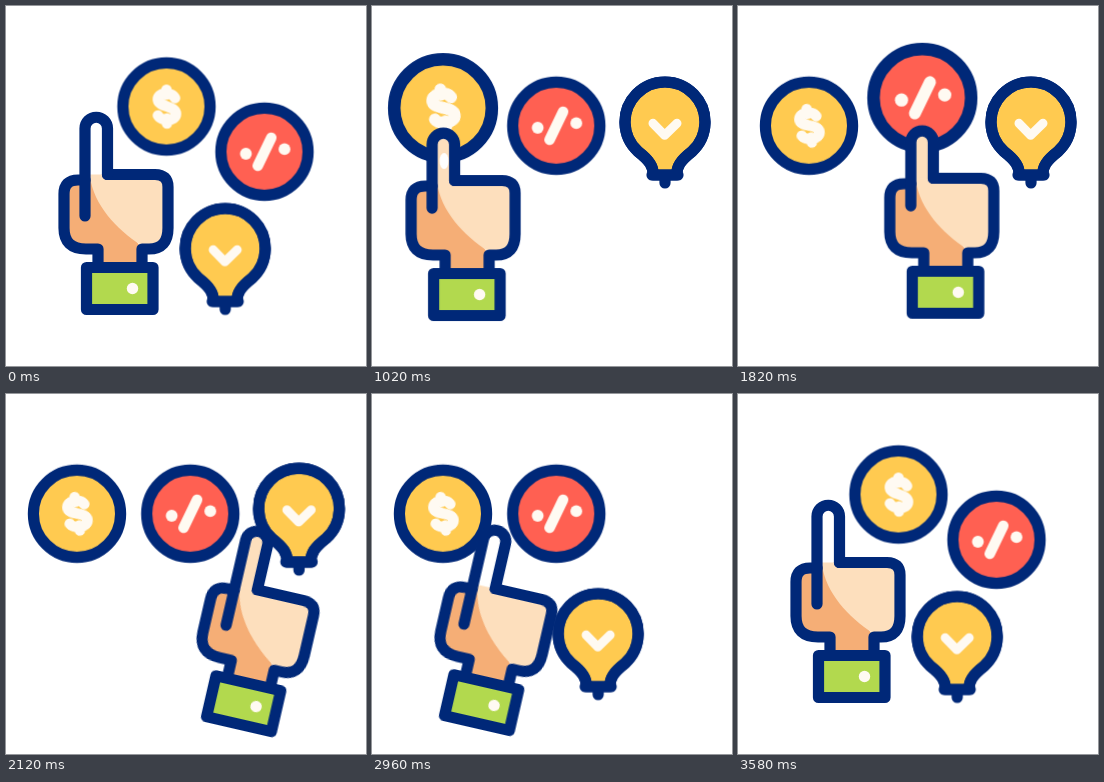
Write an HTML page that moves like this. It is 360x360 px and loops after 3.6 s.

```html
<!DOCTYPE html>
<html lang="en">
<head>
<meta charset="utf-8">
<title>Choosing an offer</title>
<style>
html, body { margin: 0; width: 100%; height: 100%; overflow: hidden; background: #fff; }
svg { display: block; width: 100vw; height: 100vh; }

.line { fill: none; stroke: #002878; stroke-width: 11.2; stroke-linecap: round; stroke-linejoin: round; }
.mark { fill: none; stroke: #fffaf2; stroke-width: 9; stroke-linecap: round; stroke-linejoin: round; }
.bold { stroke-width: 10.6; }
.dot { fill: #fffaf2; }
.gold { fill: #ffca50; }
.red { fill: #ff6052; }
.green { fill: #b2d94e; }
.skin { fill: #fddfbd; }
.shade { fill: #f5ae76; }

.anim { animation: 3.6s ease-in-out infinite; }
.dollar { animation-name: dollar; }
.turn { animation-name: turn; }
.percent { animation-name: percent; }
.balloon-x { animation-name: balloon-x; }
.balloon-y { animation-name: balloon-y; }
.swell { animation-name: swell; }
.hand-x { animation-name: hand-x; }
.hand-y { animation-name: hand-y; }
.finger { animation-name: press; }
.tip { animation-name: tip, tint; }
.shine { animation-name: shine; }

@keyframes dollar {
  0%, 2.8% { transform: translate(160.5px, 100.5px); }
  8.6% { transform: translate(71px, 119.7px); }
  12.2% { transform: translate(71px, 119.7px); animation-timing-function: cubic-bezier(.2, .6, .35, 1); }
  20.6%, 28.1% { transform: translate(71px, 102px) scale(1.12); }
  36%, 86.5% { transform: translate(71px, 119.7px); }
  98.9%, 100% { transform: translate(160.5px, 100.5px); }
}
@keyframes turn {
  0%, 12.2% { transform: rotate(0deg); }
  20.6%, 86.5% { transform: rotate(-8deg); }
  98.9%, 100% { transform: rotate(0deg); }
}
@keyframes percent {
  0%, 4% { transform: translate(258.5px, 145.7px); }
  9.8%, 35.8% { transform: translate(184.3px, 119.7px); }
  43.3%, 50.3% { transform: translate(184.3px, 91.7px) scale(1.12); }
  58.5%, 82.5% { transform: translate(184.3px, 119.7px); }
  94.5%, 100% { transform: translate(258.5px, 145.7px); }
}
/* Separate axes bend the balloon's path */
@keyframes balloon-x {
  0%, 5.6% { transform: translateX(219.2px); animation-timing-function: cubic-bezier(.65, 0, .35, 1); }
  12.5%, 73.9% { transform: translateX(293px); animation-timing-function: cubic-bezier(.65, 0, .35, 1); }
  85.5%, 100% { transform: translateX(219.2px); }
}
@keyframes balloon-y {
  0%, 6.7% { transform: translateY(242.5px); animation-timing-function: cubic-bezier(.65, 0, .35, 1); }
  14.4%, 73.1% { transform: translateY(116px); animation-timing-function: cubic-bezier(.65, 0, .35, 1); }
  83.9%, 100% { transform: translateY(242.5px); }
}
@keyframes swell {
  0%, 57.5% { transform: translateY(0) scale(1); }
  65%, 72.6% { transform: translateY(-20px) scale(1.12); }
  79%, 100% { transform: translateY(0) scale(1); }
}
@keyframes hand-x {
  0%, 2.8% { transform: translateX(90px); }
  10.2%, 13% { transform: translateX(67.5px); }
  20%, 28.1% { transform: translateX(71px); }
  43.3%, 50.3% { transform: translateX(183.8px); }
  65%, 72.6% { transform: translateX(287px); animation-timing-function: cubic-bezier(.4, 0, .2, 1); }
  90%, 100% { transform: translateX(90px); }
}
@keyframes hand-y {
  0%, 2.8% { transform: translateY(122.5px) rotate(0deg); }
  10.2%, 28.1% { transform: translateY(128.5px) rotate(0deg); }
  35.8% { transform: translateY(143.5px) rotate(0deg); }
  43.3%, 50.3% { transform: translateY(126.2px) rotate(0deg); }
  57.6% { transform: translateY(150px) rotate(13deg); }
  65%, 72.6% { transform: translateY(126.1px) rotate(12.5deg); }
  81.7% { transform: translateY(147.5px) rotate(13deg); }
  91.5%, 100% { transform: translateY(122.5px) rotate(0deg); }
}
@keyframes press {
  0%, 12.2%, 34%, 38%, 56%, 59.5%, 78%, 100% {
    d: path("M79 210V122.5A11.25 11.25 0 0 1 101.5 122.5V168.5");
  }
  20.6%, 28.1%, 43.3%, 50.3%, 65%, 72.6% {
    d: path("M79 196V132.5A11.25 11.25 0 0 1 101.5 132.5V168.5");
  }
}
@keyframes tip {
  0%, 12.2%, 34%, 38%, 56%, 59.5%, 78%, 100% { transform: translateY(0); }
  20.6%, 28.1%, 43.3%, 50.3%, 65%, 72.6% { transform: translateY(10px); }
}
@keyframes tint {
  0%, 3%, 80%, 100% { fill: #fff; }
  8%, 74% { fill: #fddfbd; }
}
@keyframes shine {
  0%, 12.2%, 34%, 59.5%, 78%, 100% { opacity: 0; }
  20.6%, 28.4%, 65%, 72.8% { opacity: 1; }
}
</style>
</head>
<body>
<svg viewBox="0 0 360 360">
  <g class="anim dollar">
    <circle class="gold" r="43.6"/>
    <circle class="line" r="43.6"/>
    <g class="anim turn">
      <path class="mark bold" d="M8.5 -8.5C5 -15.5 -9.5 -14 -8.5 -6.5C-7.5 .5 9.5 -.5 9.5 7.5C9.5 15 -5.5 15 -8.5 9M0 -16.8V-12M.5 12V17"/>
    </g>
  </g>

  <g class="anim percent">
    <circle class="red" r="43.6"/>
    <circle class="line" r="43.6"/>
    <path class="mark bold" d="M-6.7 14L6.8 -14"/>
    <circle class="dot" cx="-18.6" cy="2" r="5.9"/>
    <circle class="dot" cx="20" cy="-2.6" r="5.9"/>
  </g>

  <g class="anim balloon-x"><g class="anim balloon-y"><g class="anim swell">
    <path id="bulb" class="gold" d="M-27 29.5A40 40 0 1 1 27 29.5C15 39 12 44 11.5 53H-11.5C-12 44 -15 39 -27 29.5Z"/>
    <use href="#bulb" class="line"/>
    <path class="line" d="M-27 29.5A40 40 0 1 1 27 29.5C15 39 12 44 11.5 53H-11.5C-12 44 -15 39 -27 29.5ZM-13 53H13M0 53V61"/>
    <path class="mark" d="M-12 1.3L-.3 13.3L12 1.3"/>
  </g></g></g>

  <g class="anim hand-x"><g class="anim hand-y"><g transform="translate(-90 -122.5)">
    <rect class="anim tip" x="79" y="111.5" width="22.5" height="66" rx="11.2" fill="#fff"/>
    <ellipse class="anim shine" cx="91" cy="149" rx="4.5" ry="8" fill="#fff"/>
    <path class="shade" d="M79 174H72Q58 174 58 188V222Q58 243 80 243H92V262H136V243L84 171Z"/>
    <path class="skin" d="M84 171C88 199 110 223 135 239V243H143Q162 243 162 222V181Q162 168.5 149 168.5H84Z"/>
    <path class="line" d="M79 174H72Q58 174 58 188V222Q58 243 80 243H92V262M101.5 168.5H149Q162 168.5 162 181V222Q162 243 143 243H136V262"/>
    <path class="line anim finger" d="M79 210V122.5A11.25 11.25 0 0 1 101.5 122.5V168.5"/>
    <rect class="green" x="80.5" y="261.5" width="66.5" height="42"/>
    <rect class="line" x="80.5" y="261.5" width="66.5" height="42"/>
    <circle class="dot" cx="126.5" cy="282.5" r="5.7"/>
  </g></g></g>
</svg>
</body>
</html>
```
